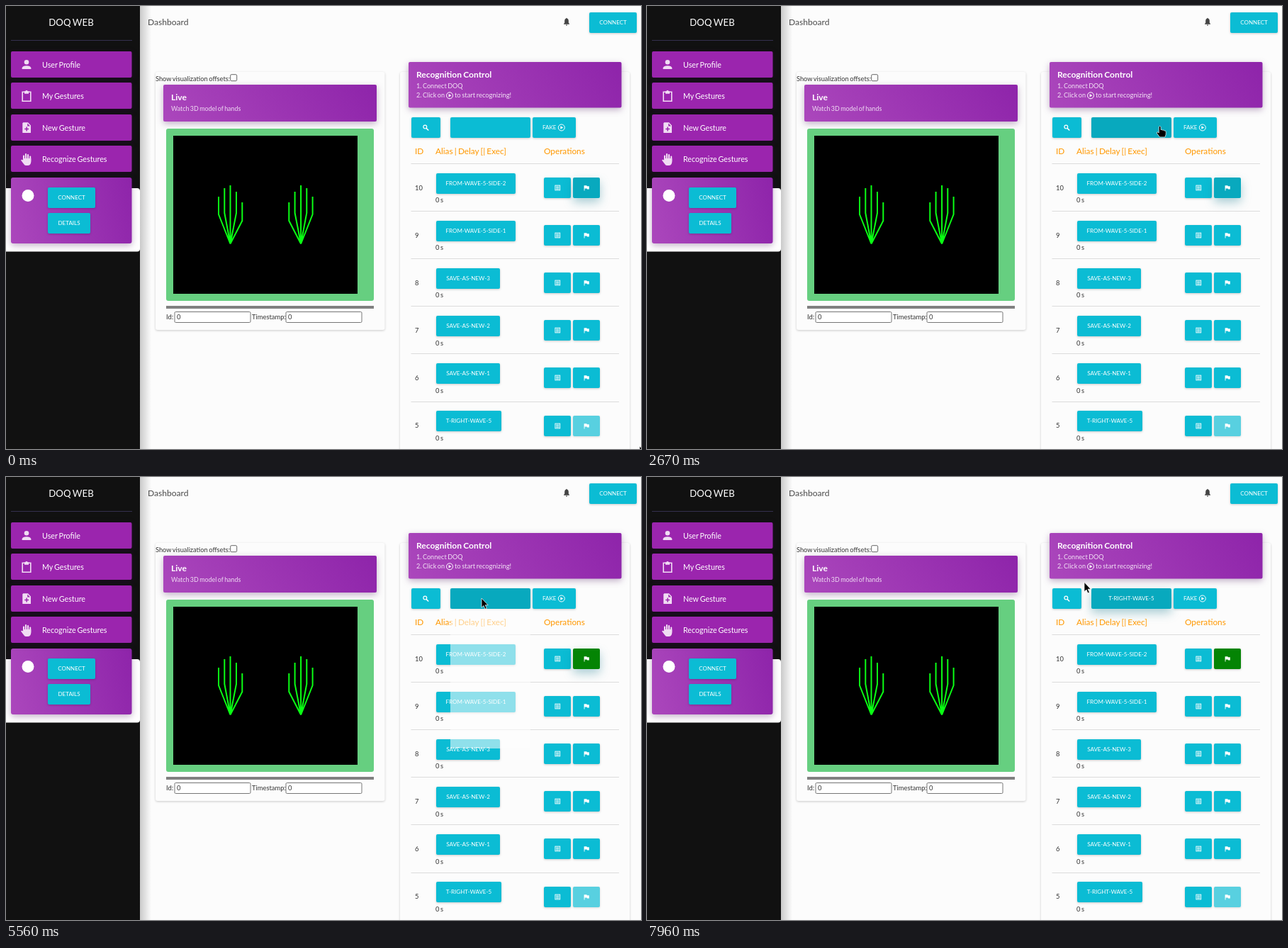
Write an HTML page that moves like this. It is 896 px wide and 625 px high and loops after 8000 ms.

```html
<!DOCTYPE html>
<html lang="en">
<head>
<meta charset="utf-8">
<title>Dashboard</title>
<style>
  html, body { margin: 0; width: 100%; height: 100%; overflow: hidden; background: #fcfcfc; }
  svg { display: block; width: 896px; height: 625px; font-family: Lato, sans-serif; word-spacing: -.8px; }
  .lift { filter: drop-shadow(0 1px 1.5px rgba(0, 0, 0, .2)); }
  .raised { filter: drop-shadow(0 3px 5px rgba(60, 0, 80, .3)); }
  .focus { filter: drop-shadow(0 6px 7px rgba(0, 110, 130, .32)); }
</style>
</head>
<body>
<svg id="stage" viewBox="0 0 896 625">
  <defs>
    <linearGradient id="purple" x1="0" y1="1" x2="1.11" y2=".86">
      <stop offset="0" stop-color="#ab47bc"/><stop offset="1" stop-color="#8e24aa"/>
    </linearGradient>
    <linearGradient id="edge">
      <stop offset="0" stop-color="#000" stop-opacity=".2"/><stop offset="1" stop-color="#000" stop-opacity="0"/>
    </linearGradient>
    <g id="play" fill="none" stroke="#fff" stroke-width="1">
      <circle r="4.5"/><path d="M-1.4-2.3 2.4 0-1.4 2.3Z" fill="#fff" stroke="none"/>
    </g>
    <path id="flag" d="M-3.4-3.2H.4L.8-2.3H3.8V2H1L.6 1.1H-2.5V4H-3.4Z" fill="#fff"/>
    <g id="list" stroke="#fff" fill="none">
      <rect x="-3.4" y="-3.4" width="6.8" height="6.8" stroke-width=".9"/>
      <path d="M-2.2-1.6H2.2M-2.2 .1H2.2M-2.2 1.8H2.2" stroke-width=".9"/>
    </g>
  </defs>
</svg>
<script>
const NS = 'http://www.w3.org/2000/svg';
const stage = document.getElementById('stage');
const LOOP = 8000, HOVER_LAG = 75;
const TEAL = '#0bbcd4', TEAL_DARK = '#08a9be', GREEN = '#048404';
const CLICK_FLAG = 3590, OPEN_MENU = 5480, FILL_MENU = 5620, CLOSE_MENU = 7390;

function add(tag, attrs, parent = stage) {
  const el = document.createElementNS(NS, tag);
  for (const key in attrs) el.setAttribute(key, attrs[key]);
  parent.appendChild(el);
  return el;
}
const box = (x, y, width, height, fill, more = {}, parent) =>
  add('rect', { x, y, width, height, fill, ...more }, parent);
const path = (d, more, parent) => add('path', { d, ...more }, parent);
const icon = (id, x, y) => add('use', { href: '#' + id, x, y });
function label(str, x, y, size, fill = '#fff', more = {}, parent) {
  const el = add('text', { x, y, 'font-size': size, fill, ...more }, parent);
  el.textContent = str;
  return el;
}
const centered = { 'text-anchor': 'middle' };

const buttons = [];
function button(x, y, w, h, str) {
  const el = box(x, y, w, h, TEAL, { rx: 2, class: 'lift' });
  if (str) label(str, x + w / 2, y + h / 2 + 2.8, 8.04, '#fff', centered);
  const item = { x, y, w, h, el };
  buttons.push(item);
  return item;
}

function drawSidebar() {
  box(189, 0, 16, 625, 'url(#edge)');
  box(0, 0, 189, 625, '#111');
  box(-6, 257, 195, 89.5, '#fff', { rx: 4 });
  label('DOQ WEB', 92, 28, 13.2, '#fff', centered);
  box(7, 48, 171, 1, '#33304e');
  ['User Profile', 'My Gestures', 'New Gesture', 'Recognize Gestures'].forEach((name, i) => {
    const y = Math.floor(64 + i * 44.6);
    box(7, y, 170.5, 37, '#9b25ae', { rx: 2, class: 'raised' });
    label(name, 51, y + 22.6, 10.72);
  });
  const pale = { fill: '#f0dcf3' };
  add('circle', { cx: 29, cy: 79.3, r: 3.3, ...pale });
  path('M22.7 89V87.3Q23.5 84.2 29 84.2T35.3 87.3V89Z', pale);
  path('M23.2 121.3H34.8V134.2H23.2Z', { fill: 'none', stroke: '#f0dcf3', 'stroke-width': 1.6 });
  path('M26 120.3H27.3A1.8 1.8 0 0 1 30.7 120.3H32V123.8H26Z', pale);
  path('M24.3 164.3H31L35 168.5V179H23.3V165.3ZM30.2 165.5V169.4H34ZM28.4 170.6V172.8H26.2V174.3H28.4V176.6H29.9V174.3H32.1V172.8H29.9V170.6Z',
    { ...pale, 'fill-rule': 'evenodd' });
  path('M25 218V211.5M28 217V209M31 217V210M34.2 219V212.5', { stroke: '#f0dcf3', 'stroke-width': 2.1, 'stroke-linecap': 'round' });
  path('M24 215H35.3V220Q35 225 30.5 225H28.5Q26.5 225 25.5 223.5L21 217.6Q22.6 216 24 217.7Z', pale);
  box(7, 242, 170.5, 93, 'url(#purple)', { rx: 3, class: 'raised' });
  add('circle', { cx: 31, cy: 267.5, r: 8.5, fill: '#fff' });
  button(59, 256, 67, 29, 'CONNECT');
  button(59, 292, 60, 29, 'DETAILS');
}

function drawHand(mirror) {
  const px = x => mirror ? 732.6 - x : x;
  const fingers = [[300, 294, 269], [308.3, 292, 257], [316.5, 291, 253], [325, 292, 262], [333.3, 303, 277]];
  const d = fingers.map(([x, knuckle, tip]) => `M${px(316.5)} 335.5L${px(x)} ${knuckle}V${tip}`).join('');
  path(d, { fill: 'none', stroke: '#0aff14', 'stroke-width': 2, 'stroke-linejoin': 'round' });
}

function drawLive() {
  label('Dashboard', 200, 26.8, 12.06, '#4a4a4a');
  path('M787 25.7V25L788.2 23.8V20.6Q788.4 18 790.3 17.5Q791 16 791.7 17.5Q793.6 18 793.8 20.6V23.8L795 25V25.7ZM789.8 26.4H792.2Q792 27.8 791 27.8T789.8 26.4Z', { fill: '#444' });
  button(823, 9, 67, 29, 'CONNECT');

  box(211, 93, 323.5, 364, '#fcfcfc', { rx: 3, class: 'lift' });
  label('Show visualization offsets:', 211, 106, 9.25, '#333');
  box(316.7, 96.7, 9, 9, '#fff', { rx: 1.5, stroke: '#666', 'stroke-width': 1 });
  box(222, 111, 301, 52, 'url(#purple)', { rx: 2, class: 'raised' });
  label('Live', 233, 133, 12.06, '#fff', { 'font-weight': 700 });
  label('Watch 3D model of hands', 233, 148, 8.9, '#f0dcf3');
  box(226, 173, 293, 243, '#66cf80', { rx: 3 });
  box(236, 183, 260, 223, '#000');
  drawHand(false);
  drawHand(true);
  box(226, 423, 293, 4, '#808080');
  [['Id:', 226, 238], ['Timestamp:', 347, 395]].forEach(([name, x, field]) => {
    label(name, x, 442.3, 9.38, '#333');
    box(field, 431.5, 107, 15, '#fff', { rx: 1.5, stroke: '#767676', 'stroke-width': 1 });
    label('0', field + 3, 442.3, 9.38, '#333');
  });
}

const rowNames = ['FROM-WAVE-5-SIDE-2', 'FROM-WAVE-5-SIDE-1', 'SAVE-AS-NEW-3', 'SAVE-AS-NEW-2', 'SAVE-AS-NEW-1', 'T-RIGHT-WAVE-5'];
const ROW_TOP = 222.5, ROW_H = 67.1;
const rows = [], flags = [];
let select, selectText;

function drawControl() {
  box(556, 93, 324, 560, '#fcfcfc', { rx: 3, class: 'lift' });
  box(568, 79, 300.5, 64.5, 'url(#purple)', { rx: 2, class: 'raised' });
  label('Recognition Control', 579, 101, 12.06, '#fff', { 'font-weight': 700 });
  label('1. Connect DOQ', 579, 116, 9.1, '#f3e2f5');
  label('2. Click on', 579, 129.3, 9.1, '#f3e2f5');
  icon('play', 626, 126.3);
  label('to start recognizing!', 633, 129.3, 9.38, '#f3e2f5');

  button(572, 157, 41, 29);
  add('circle', { cx: 591.3, cy: 170.6, r: 2.4, fill: 'none', stroke: '#fff', 'stroke-width': 1.2 });
  path('M593 172.4L596.2 175.5', { stroke: '#fff', 'stroke-width': 1.5 });
  select = button(627, 157, 113, 29);
  selectText = label('T-RIGHT-WAVE-5', 683.5, 173.6, 8.04, '#fff', centered);
  button(743, 157, 61, 29);
  label('FAKE', 757, 174, 8.04);
  icon('play', 783.8, 171.5);

  label('ID', 577, 209.3, 11.8, '#ff9800');
  label('Alias | Delay [| Exec]', 606, 209.3, 11.8, '#ff9800');
  label('Operations', 759, 209.3, 11.8, '#ff9800');

  rowNames.forEach((name, i) => {
    const y = ROW_TOP + i * ROW_H;
    const aliasY = Math.round(y + 13), opsY = Math.round(y + 19.5);
    rows.push(box(571.5, y, 293.5, ROW_H, '#f1f1ef'));
    box(571.5, Math.floor(y), 293.5, 1, '#dcdcdc');
    label(10 - i, 577, y + 37, 9.38, '#333');
    button(607, aliasY, i < 2 ? 112 : i < 5 ? 90 : 92, 29, name);
    label('0 s', 606, y + 54.7, 9.38, '#333');
    button(759, opsY, 38, 29);
    icon('list', 778.3, opsY + 14.5);
    flags.push(button(800, opsY, 38, 29));
    icon('flag', 819, opsY + 14.5);
  });
  flags[5].el.setAttribute('opacity', .68);
}

const MENU = { x: 627, y: 186, w: 113, h: 197, step: 17.87 };
const options = ['', ...rowNames, 'T-RIGHT-WAVE-4', 'T-RIGHT-WAVE-2', 'T-RIGHT-WAVE--1', 'TEST-NO-VIS-1'];
let veil, menu, marker;

function drawMenu() {
  veil = box(MENU.x, MENU.y, MENU.w, MENU.h, '#fff', { opacity: .54 });
  menu = add('g', {});
  box(MENU.x, MENU.y, MENU.w, MENU.h, '#08a7bb', { stroke: '#4b8e98', 'stroke-width': .8 }, menu);
  marker = box(MENU.x + .5, MENU.y, MENU.w - 1, MENU.step, '#1c62d2', {}, menu);
  options.forEach((name, i) =>
    label(name, 690.3, MENU.y + (i + .5) * MENU.step + 3.8, 8.1, '#fff', centered, menu));
}

drawSidebar();
drawLive();
drawControl();
drawMenu();

const outline = { fill: '#000', stroke: '#fff', 'stroke-width': .7, 'stroke-linejoin': 'round' };
const arrow = path('M0 0V13.2L3 10.5 5 15.3 7.3 14.3 5.2 9.7H9.2Z', outline);
const hand = path('M-1.4 1Q0-1 1.4 1V5.2Q3 4.4 3.8 5.7Q5.4 5 6.2 6.4Q8.2 5.8 8.6 7.8V11.5L7.3 15.4H-.2L-4.2 10Q-4.6 7.8-2.6 8.4L-1.4 9.6Z', outline);

// Each stroke runs from the previous point: start, end, x, y.
const strokes = [
  [270, 1060, 730, 308], [1100, 1900, 694, 213], [1960, 2720, 724, 169],
  [2770, 3440, 821, 262], [3830, 4600, 828, 271], [4650, 5410, 671, 171],
  [6280, 6960, 680.5, 298], [7000, 7090, 678, 306], [7400, 7940, 617, 148.5]
];
function cursorAt(t) {
  let x = 894, y = 621;
  for (const [start, end, tx, ty] of strokes) {
    if (t <= start) break;
    const u = Math.min(1, (t - start) / (end - start));
    const s = u * u * (3 - 2 * u);
    x += (tx - x) * s;
    y += (ty - y) * s;
  }
  return { x, y };
}
const inside = (p, b) => p.x >= b.x && p.x <= b.x + b.w && p.y >= b.y && p.y <= b.y + b.h;
const show = (el, on) => el.setAttribute('visibility', on ? 'visible' : 'hidden');

function render(t) {
  const now = cursorAt(t), late = cursorAt(Math.max(0, t - HOVER_LAG));
  const open = t >= OPEN_MENU && t < CLOSE_MENU;
  const hovered = open ? null : buttons.find(b => inside(late, b));

  for (const b of buttons) {
    const focused = b === flags[0] ? t < OPEN_MENU + 200 : b === select && t >= CLOSE_MENU;
    const dark = b === hovered || focused || (b === select && open);
    const done = b === flags[0] && t >= CLICK_FLAG;
    b.el.setAttribute('fill', done ? GREEN : dark ? TEAL_DARK : TEAL);
    b.el.setAttribute('class', focused ? 'focus' : 'lift');
  }
  const overTable = !open && late.x > 571.5 && late.x < 865;
  const row = Math.floor((late.y - ROW_TOP) / ROW_H);
  rows.forEach((el, i) => show(el, overTable && i === row));

  show(selectText, t >= CLOSE_MENU);
  show(veil, open && t < FILL_MENU);
  show(menu, open && t >= FILL_MENU);
  const item = Math.max(0, Math.floor((late.y - MENU.y) / MENU.step));
  marker.setAttribute('y', MENU.y + item * MENU.step);

  show(hand, hovered);
  show(arrow, !hovered);
  (hovered ? hand : arrow).setAttribute('transform', `translate(${now.x} ${now.y})`);
}

const begin = performance.now();
function tick() {
  render((performance.now() - begin) % LOOP);
  requestAnimationFrame(tick);
}
tick();
</script>
</body>
</html>
```
